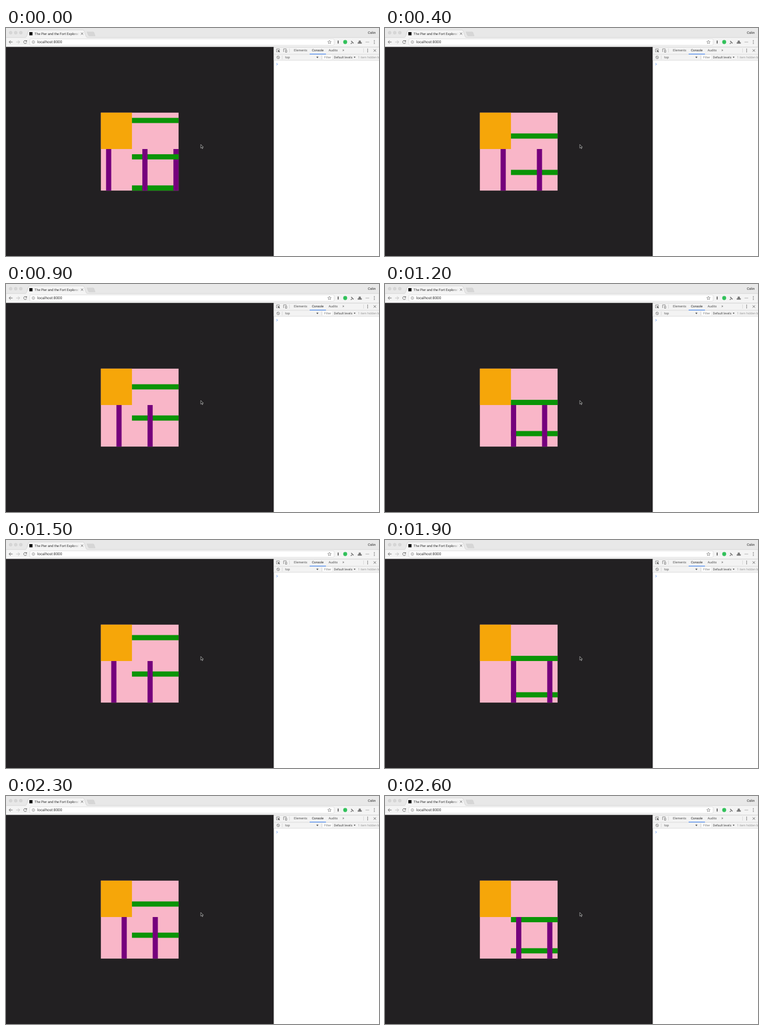
An HTML page that plays this animation: 640 px wide and 390 px high, repeating every 2.7 s.

```html
<!DOCTYPE html>
<html lang="en">
<head>
<meta charset="utf-8">
<title>Crossing stripes</title>
<style>
  html, body { margin: 0; height: 100%; overflow: hidden; background: #222022; }
  svg { display: block; width: 100vw; height: 100vh; }
  text { font: 5.5px Roboto, Arial, sans-serif; fill: #555; text-rendering: geometricPrecision; }
  .line { fill: none; stroke: #666; stroke-width: .9; }
  .rule { stroke: #ccc; stroke-width: .6; }
</style>
</head>
<body>
<svg viewBox="0 0 640 390">
  <defs>
    <linearGradient id="fade">
      <stop offset="0" stop-color="#f4f4f4" stop-opacity="0"/>
      <stop offset="1" stop-color="#f4f4f4"/>
    </linearGradient>
  </defs>

  <!-- tab strip -->
  <rect width="640" height="17" fill="#e8e8e8"/>
  <g fill="#d6d6d6" stroke="#c8c8c8" stroke-width=".4">
    <circle cx="8" cy="8" r="2.6"/>
    <circle cx="16.7" cy="8" r="2.6"/>
    <circle cx="25.4" cy="8" r="2.6"/>
    <path d="M139 6.7h10.5q1 0 1.4 1l2.2 5.8h-10.4q-1 0-1.4-1z"/>
  </g>
  <path d="M0 16.3H33q1.500 0 2.200-2L38.200 5.500Q39 3.300 41 3.300H131.500q2 0 2.800 2.200l3 8.800q.7 2 2.200 2H640V32.500H0z" fill="#f4f4f4" stroke="#c2c2c2" stroke-width=".5"/>
  <rect x="40" y="7" width="5.500" height="5.500" fill="#111"/>
  <text x="49" y="11.700" style="font-size:5.8px;fill:#333">The Pier and the Fort Explorat</text>
  <rect x="116" y="5" width="10" height="9" fill="url(#fade)"/>
  <path class="line" d="M128.700 7.900l3.600 3.600m0-3.600l-3.600 3.600"/>
  <text x="621" y="10.300" style="font-size:5.8px;fill:#222">Colin</text>

  <!-- toolbar -->
  <path class="line" d="M11.300 24H5.300m2.700-2.700L5.300 24l2.700 2.700"/>
  <path class="line" d="M17.500 24h6m-2.700-2.700l2.700 2.700-2.700 2.700" style="stroke:#bbb"/>
  <path class="line" d="M35 22.400a2.600 2.600 0 1 0 .4 2.400m.1-3.800v2h-2"/>
  <rect x="41" y="18.700" width="522" height="10.800" rx="1.500" fill="#fff" stroke="#c8c8c8" stroke-width=".5"/>
  <circle class="line" cx="47" cy="24" r="2.300" style="stroke-width:.6"/>
  <path class="line" d="M47 23.600v1.700M47 22.400v.6" style="stroke-width:.6"/>
  <text x="53.600" y="26.200" style="font-size:6.5px;fill:#333">localhost:8000</text>
  <path class="line" d="M555 21l.9 2 2.200.2-1.700 1.400.5 2.200-1.900-1.200-1.900 1.200.5-2.200-1.700-1.400 2.200-.2z" style="stroke-width:.6"/>
  <path d="M569 21.500h1.800v5H569z" fill="#666"/>
  <circle cx="582" cy="24" r="3.400" fill="#32c15b"/>
  <path class="line" d="M592.300 22.200l4 4m-2.700-.7l-2 1.500" style="stroke-width:1.300"/>
  <path d="M603.500 24.500h1.300l.8-3h2.800l.8 3h1.300v2.200h-7z" fill="#777"/>
  <path d="M616.800 23.300h6.400v1.600h-6.400z" fill="#ccc"/>
  <g fill="#666"><circle cx="632" cy="21.500" r=".75"/><circle cx="632" cy="24" r=".75"/><circle cx="632" cy="26.500" r=".75"/></g>

  <!-- page and console panel -->
  <rect y="32.500" width="460" height="357.500" fill="#222022"/>
  <rect x="459.500" y="32.500" width="180.500" height="357.500" fill="#fff"/>
  <rect x="459.500" y="32.500" width="180.500" height="22.700" fill="#f3f3f3"/>
  <path class="rule" d="M459.800 32.500V390M460 32.700h180M460 45h180M460 55.200h180M486.500 35v7M613.500 35v7M474 47v6.500M541.500 47v6.500"/>
  <path class="line" d="M466 40.800h-1.800v-5h5v1.800" style="stroke-width:.7"/>
  <path d="M466.300 37.500l3.800 1.500-1.500.7 1.400 1.400-.7.700-1.400-1.400-.7 1.300z" fill="#555"/>
  <path class="line" d="M476.300 41v-5.300h4.500v1.300m-1.300 1h2.300v3.500h-2.300z" style="stroke-width:.7"/>
  <text x="494" y="40.300">Elements</text>
  <text x="525" y="40.300" style="fill:#222">Console</text>
  <text x="553.500" y="40.300">Audits</text>
  <text x="577" y="40.300" style="font-size:7px">»</text>
  <path d="M521 44h28v1.100h-28z" fill="#4285f4"/>
  <g fill="#555"><circle cx="620.500" cy="36.200" r=".7"/><circle cx="620.500" cy="38.500" r=".7"/><circle cx="620.500" cy="40.800" r=".7"/></g>
  <path class="line" d="M630.800 36.500l4 4m0-4l-4 4"/>
  <circle class="line" cx="467" cy="50.200" r="2.300" style="stroke-width:.7"/>
  <path class="line" d="M465.400 48.600l3.200 3.200" style="stroke-width:.7"/>
  <text x="479" y="52">top</text>
  <path d="M532.500 49h3.600l-1.800 2.700zM596.700 49h3l-1.500 2.500z" fill="#555"/>
  <rect x="544" y="46.500" width="15" height="7.300" fill="#fff"/>
  <text x="546" y="52" style="font-size:5.3px;fill:#777">Filter</text>
  <text x="562.700" y="52" style="font-size:5.3px;fill:#444">Default levels</text>
  <text x="604" y="52" style="font-size:5.3px;fill:#999">1 item hidden by filters</text>
  <path class="line" d="M464.200 60.300l1.600 1.600-1.600 1.600" style="stroke:#4285f4"/>

  <!-- board, in units of one cell -->
  <g transform="translate(162.800 144.800) scale(8.889)">
    <rect width="15" height="15" fill="#f9b6c8"/>
    <rect width="6" height="7" fill="#f6a609"/>
    <g id="stripes"></g>
  </g>

  <path d="M334.200 199.200v6.300l1.500-1.300 1.100 2.300 1-.5-1.100-2.200h2z" fill="#111" stroke="#ddd" stroke-width=".6"/>
</svg>
<script>
  const STEP = 100, LOOP = 2700, SIZE = 15, CYCLE = 13;
  const stripes = document.getElementById('stripes');
  const rect = (x, y, w, h, fill) =>
    `<rect x="${x}" y="${y}" width="${w}" height="${h}" fill="${fill}"/>`;

  // Stripes enter at cell 1, alternately 6 and 7 steps apart.
  const isStripe = (pos, step) => [1, 8].includes((pos - step + 2 * CYCLE) % CYCLE);

  function draw(step) {
    let out = '';
    for (let pos = SIZE - 1; pos > 0; pos--) {
      if (!isStripe(pos, step)) continue;
      out += rect(6, pos, 9, 1, '#0a9406') + rect(pos, 7, 1, 8, '#75007c');
    }
    stripes.innerHTML = out;
  }

  let shown = -1;
  function tick() {
    // The first position is held for two steps.
    const step = Math.max(0, Math.floor(performance.now() % LOOP / STEP) - 1);
    if (step !== shown) draw(shown = step);
    requestAnimationFrame(tick);
  }
  tick();
</script>
</body>
</html>
```
